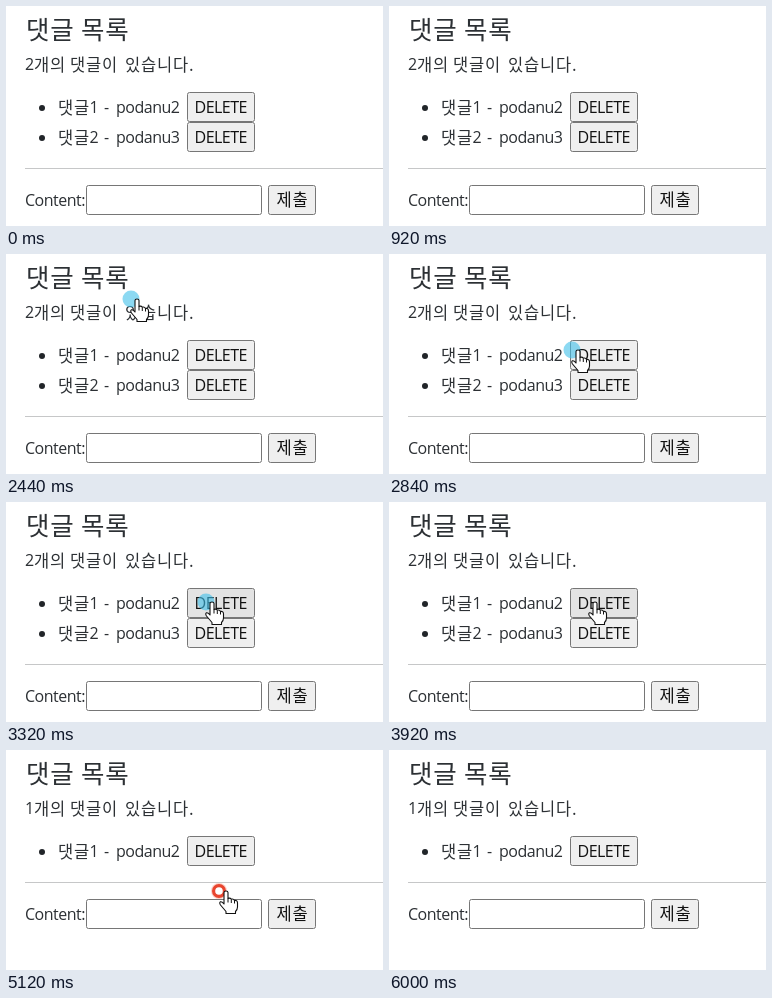
Animation of 377x220 px, one loop 6.16 s. Source, as an HTML page:

```html
<!DOCTYPE html>
<html lang="ko">
<head>
<meta charset="utf-8">
<style>
  html, body { margin: 0; width: 100%; height: 100%; overflow: hidden; background: #fff; }
  svg { display: block; width: 100vw; height: 100vh; }
  text { font: 16px "Open Sans", "Noto Sans CJK KR", "Noto Sans CJK", sans-serif; letter-spacing: -.5px; fill: #2c3034; }
  .ko { font-family: "Noto Sans CJK KR", "Noto Sans CJK", sans-serif; font-size: 16.5px; letter-spacing: .8px; }
  .title { font-size: 25.5px; letter-spacing: .8px; }
  .box { stroke: #767676; }
  .btn { fill: #efefef; }
  .cap { fill: #111; }
</style>
</head>
<body>
<svg viewBox="0 0 377 220">
  <rect width="377" height="220" fill="#fff"/>
  <text class="ko title" y="33.3"><tspan x="20">댓글</tspan><tspan x="75">목록</tspan></text>
  <text x="19" y="64" id="count">2</text>
  <text class="ko" y="64.5"><tspan x="28">개의</tspan><tspan x="64">댓글이</tspan><tspan x="119">있습니다.</tspan></text>
  <g id="list"></g>
  <g id="form">
    <path d="M19 162.5H377" stroke="#c6c7c8"/>
    <text x="19" y="200">Content:</text>
    <rect class="box" x="80.5" y="179.5" width="175" height="29" rx="2" fill="#fff"/>
    <rect class="box btn" x="262.5" y="179.5" width="47" height="29" rx="2"/>
    <text class="ko cap" x="270.5" y="200.3">제출</text>
  </g>
  <g id="pointer">
    <circle id="blue" cx="-6" cy="-1" r="8.5" fill="#3fc0ea" opacity=".6"/>
    <g id="red">
      <circle cx="-7" cy="-1" r="8" fill="#f9b9ae" opacity=".7"/>
      <circle cx="-7" cy="-1" r="5.4" fill="#fff" stroke="#e8452f" stroke-width="3.2"/>
    </g>
    <g transform="translate(0 -1)" stroke="#111">
      <path fill="#fff" stroke-width="1.1" stroke-linejoin="round"
        d="M-2 13V1.5Q-2 0 0 0T2 1.5V7.5Q4 6.5 5.3 8.2Q7.5 7.5 8.5 9.4Q11.5 9 11.5 12V16Q11.5 18.5 9.5 20.5V22.5H0V20.5L-5.5 14Q-7 11.7-5.5 10.8Q-4.3 10.3-2 13Z"/>
      <path d="M2 7.5V11.5M5.3 8.5V12M8.5 9.5V12.5" fill="none"/>
    </g>
  </g>
</svg>
<script>
const LOOP = 6160;
const DELETED = 4560;
const el = id => document.getElementById(id);

function row(n, y) {
  return `<g id="row${n}"><circle cx="36" cy="${y + 1}" r="3" fill="#212529"/>
    <text class="ko" x="52" y="${y + 6.5}">댓글</text>
    <text y="${y + 6}"><tspan x="83.5">${n}</tspan><tspan x="98">-</tspan><tspan x="110">podanu${n + 1}</tspan></text>
    <rect id="btn${n}" class="box btn" x="181.5" y="${y - 14.5}" width="67" height="29" rx="2"/>
    <text class="cap" x="188.5" y="${y + 6}">DELETE</text></g>`;
}
el('list').innerHTML = row(1, 101) + row(2, 131);

// fingertip position: [ms, x, y]
const path = [
  [2280, 108, -24], [2440, 131, 46], [2640, 166, 88], [2840, 189, 97],
  [3080, 206, 101], [3920, 206, 101], [4160, 220, 142],
  [5120, 220, 142], [5400, 236, 62], [5640, 250, -28]
];

function place(t) {
  const i = path.findIndex(p => p[0] > t);
  if (i < 1) return null;
  const [t0, x0, y0] = path[i - 1], [t1, x1, y1] = path[i];
  const k = (t - t0) / (t1 - t0);
  return [x0 + (x1 - x0) * k, y0 + (y1 - y0) * k];
}

const show = (id, on) => el(id).setAttribute('display', on ? 'inline' : 'none');
const hover = (n, on) => { el('btn' + n).style.fill = on ? '#e3e3e3' : '#efefef'; };

function draw(ms) {
  const t = Math.floor(ms % LOOP / 40) * 40;
  const gone = t >= DELETED;
  const pos = place(t);

  el('count').textContent = gone ? 1 : 2;
  show('row2', !gone);
  el('form').setAttribute('transform', `translate(0 ${gone ? -30 : 0})`);
  hover(1, t >= 2920 && t < 4040);
  hover(2, t >= 4040 && !gone);

  show('pointer', pos);
  if (pos) el('pointer').setAttribute('transform', `translate(${pos})`);
  show('blue', t < 3560);
  show('red', t >= 4160 && t < 5200);
}

const start = performance.now();
function tick() {
  draw(performance.now() - start);
  requestAnimationFrame(tick);
}
tick();
</script>
</body>
</html>
```
